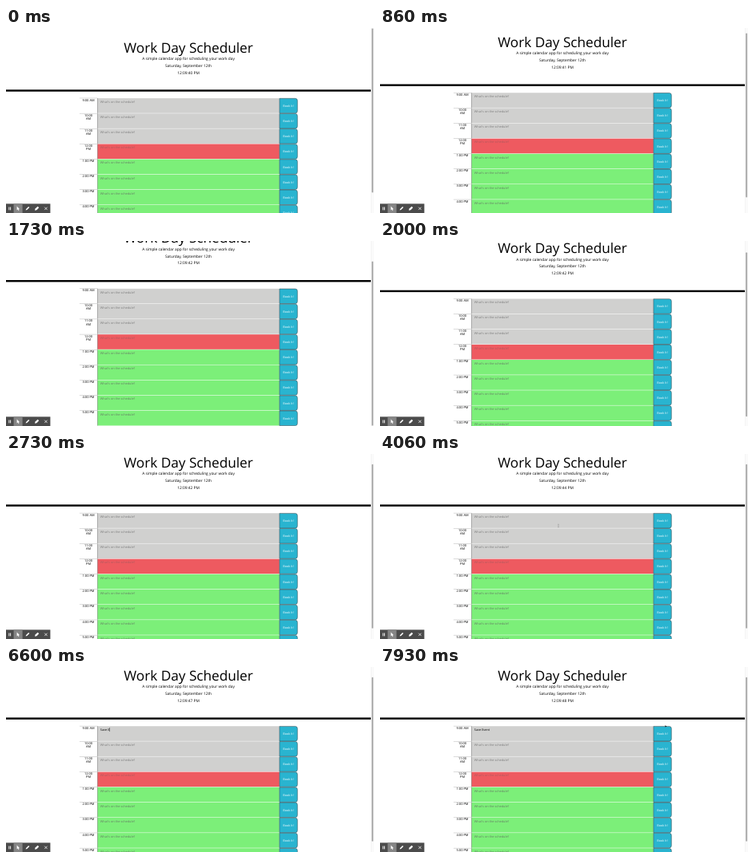
Recreate the animation shown at these times as an HTML page. Size 460 px wide and 232 px high, loop 8000 ms.

```html
<!DOCTYPE html>
<html lang="en">
<head>
<meta charset="utf-8">
<title>Work Day Scheduler</title>
<style>
html, body { margin: 0; width: 100%; height: 100%; overflow: hidden; background: #fff; }
svg { display: block; width: 460px; height: 232px; }
text { font-family: "Open Sans", sans-serif; text-rendering: geometricPrecision; white-space: pre; }
</style>
</head>
<body>
<svg id="stage" viewBox="0 0 460 232"></svg>
<script>
const LOOP = 8000, FPS = 15;
const ROW_TOP = 88.1, ROW_H = 19.13, TEXT_X = 117.8;
const VIEW_H = 232, PAGE_H = 260.3;
const stage = document.getElementById('stage');

function add(parent, tag, attrs, content) {
  const node = document.createElementNS('http://www.w3.org/2000/svg', tag);
  for (const key in attrs) node.setAttribute(key, attrs[key]);
  if (content) node.textContent = content;
  parent.appendChild(node);
  return node;
}
const box = (parent, x, y, width, height, fill) =>
  add(parent, 'rect', { x, y, width, height, fill });
const label = (parent, x, y, size, content, fill = '#000', anchor = 'middle') =>
  add(parent, 'text', { x, y, 'font-size': size, fill, 'text-anchor': anchor }, content);
const shape = (parent, d, fill, stroke = 'none', width = 0) =>
  add(parent, 'path', { d, fill, stroke, 'stroke-width': width });

const TENSES = {
  past: ['#d0d0cf', '#7c7c7c'],
  present: ['#ee5a60', '#ae5a5e'],
  future: ['#7cef79', '#667c66']
};
const HOURS = ['9:00 AM', '10:00 AM', '11:00 AM', '12:00 PM', '1:00 PM',
  '2:00 PM', '3:00 PM', '4:00 PM', '5:00 PM'];

// Page content
box(stage, 0, 0, 460, 232, '#fff');
const page = add(stage, 'g', {});
label(page, 228, 30.6, 17.2, 'Work Day Scheduler');
label(page, 228, 40.3, 4.8, 'A simple calendar app for scheduling your work day');
label(page, 228, 49, 4.8, 'Saturday, September 12th');
const clock = label(page, 228, 57.7, 4.8, '');
box(page, 0, 77.3, 456.2, 2.4, '#000');

const notes = HOURS.map((hour, i) => {
  const y = ROW_TOP + i * ROW_H;
  const [fill, hint] = TENSES[i < 3 ? 'past' : i === 3 ? 'present' : 'future'];
  box(page, 91.9, y - 0.3, 22.5, 0.35, '#999');
  const parts = hour.length > 7 ? hour.split(' ') : [hour];
  parts.forEach((part, k) => label(page, 103, y + 3.4 + k * 4.1, 4, part));
  box(page, 114.4, y, 227.4, ROW_H - 0.5, fill);
  box(page, 114.2, y, 0.4, ROW_H - 0.4, '#555');
  shape(page, `M341.9 ${y + 0.2}h19.6q2.8 0 2.8 2.8v${ROW_H - 6.2}q0 2.8 -2.8 2.8h-19.6z`,
    '#29b4d0', '#3b4a50', 0.55);
  label(page, 353, y + 10.9, 3.75, 'Book It!', '#fff');
  return label(page, TEXT_X, y + 5.8, 3.86, "What's on the schedule?", hint, 'start');
});
const note = notes[0];
const caret = box(page, 0, ROW_TOP + 1.9, 0.45, 4.8, '#000');

// Scrollbar
box(stage, 456.2, 0, 3.8, 232, '#fafafa');
box(stage, 456.2, 0, 0.3, 232, '#e4e4e4');
const thumb = add(stage, 'rect', { x: 457.2, y: 0, width: 1.9, rx: 0.95,
  height: VIEW_H * VIEW_H / PAGE_H - 0.8, fill: '#a9a9a9' });

// Recorder toolbar
box(stage, 0, 220.4, 55.4, 11.6, '#4b4b4b');
box(stage, 9.6, 220.4, 11, 11.6, '#858585');
box(stage, 3.4, 224.5, 0.9, 3.9, '#fff');
box(stage, 5.2, 224.5, 0.9, 3.9, '#fff');
shape(stage, 'M13.6 223.6v5l1.2-1.1 .9 1.8 .7-.4-.8-1.7h1.5z', '#fff');
shape(stage, 'M24.6 228.6l.5-1.7 3-3 1.2 1.2-3 3z', '#fff');
shape(stage, 'M36 228.8l.6-2.4 3-2.7 1.6 1.6-2.8 2.9z', '#fff');
shape(stage, 'M48.2 224.7l3.4 3.4m0-3.4l-3.4 3.4', 'none', '#fff', 0.75);

// Mouse pointers, tip or centre at the origin
const beam = shape(stage, 'M-.6 -1.8h1.2M0 -1.8v3.6M-.6 1.8h1.2', 'none', '#777', 0.4);
const arrow = shape(stage, 'M0 0v2.6l.7-.6h1.1z', '#000');

// Keyframes: [time, value]
const SCROLL = [[550, 0], [800, 4.5], [1000, 11.5], [1200, 16.4], [1400, 19], [1467, 20.4],
  [1600, 26], [1720, 28.3], [1750, 28.3], [1867, 23.5], [2000, 15.6], [2133, 13.9]];
const BEAM_X = [[3330, 240], [4060, 223]];
const BEAM_Y = [[3330, 160], [4060, 90]];
const ARROW_X = [[7790, 350], [7930, 356.6]];
const ARROW_Y = [[7790, 77], [7930, 72.9]];
const TICKS = [460, 1460, 3060, 3460, 4460, 5460, 6460, 7460];
const TYPED = 'Save Event';
const KEYS = [5000, 5060, 5130, 5200, 6060, 6600, 6800, 7000, 7060, 7200];
const CARET_ON = [[4600, 5660], [6060, 7660]];

function track(keys, t) {
  if (t <= keys[0][0]) return keys[0][1];
  for (let i = 1; i < keys.length; i++) {
    const [t0, a] = keys[i - 1], [t1, b] = keys[i];
    if (t <= t1) return a + (b - a) * (t - t0) / (t1 - t0);
  }
  return keys[keys.length - 1][1];
}
const passed = (times, t) => times.filter(at => t >= at).length;
const show = (node, on) => node.setAttribute('visibility', on ? 'visible' : 'hidden');
const place = (node, x, y) => node.setAttribute('transform', `translate(${x} ${y})`);

function draw(ms) {
  const t = Math.floor((ms % LOOP + 7) * FPS / 1000) * 1000 / FPS;
  const scroll = track(SCROLL, t);
  place(page, 0, -scroll);
  thumb.setAttribute('y', 0.4 + scroll * VIEW_H / PAGE_H);
  clock.textContent = `12:09:${40 + passed(TICKS, t)} PM`;

  const typed = TYPED.slice(0, passed(KEYS, t));
  note.textContent = typed || "What's on the schedule?";
  note.setAttribute('fill', typed ? '#000' : TENSES.past[1]);
  const width = typed ? note.getComputedTextLength() : 0;
  caret.setAttribute('x', TEXT_X + width + 0.2);
  show(caret, CARET_ON.some(([from, to]) => t >= from && t < to));

  show(beam, t >= 3330 && t < 5000);
  place(beam, track(BEAM_X, t), track(BEAM_Y, t));
  show(arrow, t >= 7790);
  place(arrow, track(ARROW_X, t), track(ARROW_Y, t));
}

const start = performance.now();
function loop() {
  draw(performance.now() - start);
  requestAnimationFrame(loop);
}
loop();
</script>
</body>
</html>
```
